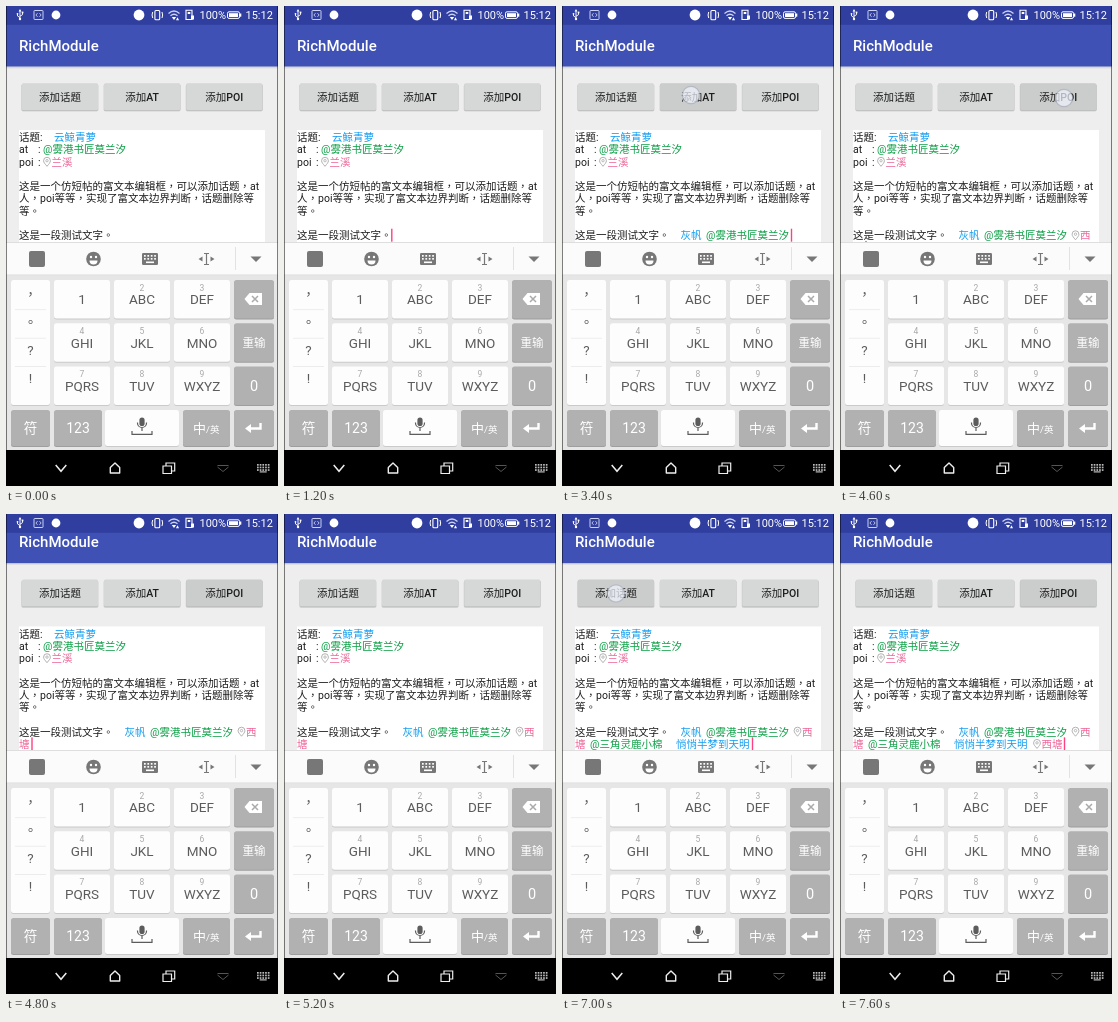
Write an HTML page that moves like this. It is 272 px wide and 480 px high and loops after 8 s.

```html
<!DOCTYPE html>
<html lang="zh-Hant">
<head>
<meta charset="utf-8">
<title>RichModule</title>
<style>
html, body { margin: 0; width: 100%; height: 100%; overflow: hidden; background: #000; }
svg { display: block; width: 100%; height: 100%; }
text { font-family: Roboto, "Noto Sans CJK TC", "Noto Sans CJK SC", "Noto Sans CJK", sans-serif; }
</style>
</head>
<body>
<svg id="stage" viewBox="0 0 272 480"></svg>
<script>
const BLUE = '#129df0', GREEN = '#0b9f45', PINK = '#ee6699', INK = '#1c1c1c';
const LINE = 12.25, SIZE = 10.5, SCROLL = 11.6;

const rect = (x, y, w, h, fill, more = '') =>
  `<rect x="${x}" y="${y}" width="${w}" height="${h}" fill="${fill}" ${more}/>`;
const circle = (x, y, r, fill, more = '') =>
  `<circle cx="${x}" cy="${y}" r="${r}" fill="${fill}" ${more}/>`;
const line = (d, color, width = 1, more = '') =>
  `<path d="${d}" fill="none" stroke="${color}" stroke-width="${width}" ${more}/>`;
const shape = (d, fill) => `<path d="${d}" fill="${fill}"/>`;
const text = (x, y, str, size, fill, more = '') =>
  `<text x="${x}" y="${y}" font-size="${size}" fill="${fill}" ${more}>${str}</text>`;
const mid = (x, y, str, size, fill, more = '') =>
  text(x, y, str, size, fill, 'text-anchor="middle" ' + more);
const group = (body, more = '') => `<g ${more}>${body}</g>`;

const baseline = row => 135.2 + row * LINE;
const word = (x, row, str, color = INK) => text(x, baseline(row), str, SIZE, color);
const place = (x, row, str) => {
  const y = baseline(row);
  return line(`M${x + 4} ${y + .6}C${x + 2} ${y - 2} ${x + .6} ${y - 3} ${x + .6} ${y - 5}` +
    `a3.4 3.4 0 0 1 6.8 0C${x + 7.4} ${y - 3} ${x + 6} ${y - 2} ${x + 4} ${y + .6}Z`, '#aaa', .9) +
    circle(x + 4, y - 5, 1.2, 'none', 'stroke="#aaa" stroke-width=".8"') +
    word(x + 8.5, row, str, PINK);
};

// Pieces added to the text, with the caret position after each
const inserts = [
  { caret: 107.8, body: '' },
  { caret: 142, body: word(118.5, 8, '灰帆', BLUE) },
  { caret: 229.5, body: word(144, 8, '@雾港书匠莫兰汐', GREEN) },
  { caret: 26, row: 9, body: place(231.5, 8, '西') + word(13, 9, '塘', PINK) },
  { caret: 104.5, row: 9, body: word(28, 9, '@三角灵鹿小棉', GREEN) },
  { caret: 190.5, row: 9, body: word(114, 9, '悄悄半梦到天明', BLUE) },
  { caret: 224.5, row: 9, body: place(193, 9, '西塘') }
];

const buttons = [['添加话题', ''], ['添加', 'AT'], ['添加', 'POI']];
const touches = [[54, 91], [129, 89], [224, 92]];

// time, pieces shown, touched button (-1 none), caret visible
const steps = [
  [0, 0, -1, 0], [200, 0, -1, 1], [800, 0, -1, 0], [1200, 0, -1, 1],
  [1800, 0, 0, 0], [2000, 1, 0, 1], [2200, 1, -1, 1], [2400, 1, -1, 0],
  [3000, 1, -1, 1], [3200, 1, 1, 1], [3400, 2, 1, 1], [3600, 2, -1, 1],
  [4000, 2, -1, 0], [4400, 2, 2, 1], [4600, 3, 2, 1], [4800, 3, -1, 1],
  [5200, 3, -1, 0], [5800, 3, -1, 1], [6200, 3, 1, 0], [6600, 4, 1, 1],
  [6800, 4, 0, 1], [7000, 5, 0, 1], [7200, 5, 2, 1], [7400, 6, 2, 1],
  [7600, 6, -1, 1]
];
const stepAt = t => steps.filter(s => s[0] <= Math.max(t, 0)).pop();

function page() {
  let s = rect(0, 0, 272, 60.7, '#3f51b5') + rect(0, 60.7, 272, .9, '#c2c2c6') + rect(0, 61.6, 272, 1, '#e0e0e2') +
    text(13, 44.8, 'RichModule', 15, '#fff', 'font-weight="500"');
  buttons.forEach(([han, latin], i) => {
    const x = 15.8 + i * 82.2;
    s += rect(x - .5, 78.2, 77.2, 27.3, '#000', 'rx="2" opacity=".12"') +
      rect(x, 77.7, 76.2, 27, '#000', 'rx="1.5" opacity=".14"') +
      rect(x, 77.2, 76.2, 27, '#d6d7d7', 'rx="1.5" class="key"') +
      mid(x + 38.1, 94.9, `${han}<tspan font-weight="500">${latin}</tspan>`, 10.5, '#1c1c1c');
  });
  s += rect(13, 124, 246, 140, '#fff') +
    word(13, 0, '话题:') + word(48, 0, '云鲸青萝', BLUE) +
    word(13, 1, 'at') + word(32, 1, ':') + word(37, 1, '@雾港书匠莫兰汐', GREEN) +
    word(13, 2, 'poi') + word(32, 2, ':') + place(37, 2, '兰溪') +
    word(13, 4, '这是一个仿短帖的富文本编辑框，可以添加话题，at') +
    word(13, 5, '人，poi等等，实现了富文本边界判断，话题删除等') +
    word(13, 6, '等。') + word(13, 8, '这是一段测试文字。');
  s += inserts.map(p => group(p.body, 'class="piece"')).join('');
  return s + rect(0, 0, 1.4, 13, '#ff4081', 'id="caret"');
}

function statusBar() {
  const w = '#fff', d = '#c9d0f2';
  return rect(0, 0, 272, 18.8, '#303f9f') +
    line('M14 4.5V13M14 11.5L11.5 10V8M14 10.2L16.5 8.7V7', w, .9) + shape('M12.6 5.5L14 3L15.4 5.5Z', w) +
    circle(14, 13, 1.2, w) + circle(11.5, 7.8, .9, w) + rect(15.7, 5.6, 1.7, 1.7, w) +
    rect(28, 4.5, 9, 9, 'none', `stroke="${d}" rx=".6"`) +
    line('M31.5 7.2L29.9 9L31.5 10.8M33.5 7.2L35.1 9L33.5 10.8', d, .9) +
    circle(50, 9, 4.4, w) + circle(133, 9, 5.4, w) +
    rect(148.9, 4.5, 4.8, 9.2, 'none', `stroke="${w}" stroke-width="1.1" rx="1"`) +
    line('M146.7 6Q145.4 9 146.7 12M156 6Q157.3 9 156 12', w, 1) +
    line('M162.5 7.5Q168 2.5 173.5 7.5M164.5 9.7Q168 6.8 171.5 9.7', d, 1.3) +
    shape('M165.8 11L168 14L170.2 11Z', w) + shape('M170 14.2l1.5-3 1.5 3Z', w) +
    line('M180 4.3H186V13.5H180Z', w, 1.1) + rect(181.7, 6, 2.6, 2, w) + rect(185, 9.5, 3, 4, w) +
    text(193.5, 13, '100%', 11, w) +
    rect(221.5, 5.8, 12, 6.6, 'none', `stroke="${w}" rx="1.5"`) + rect(234, 7.5, 1.3, 3.2, w) +
    rect(223, 7.2, 9, 3.8, w) +
    text(239.5, 13, '15:12', 11, w);
}

function key(x, y, w, h, dark) {
  return rect(x, y + 1, w, h, dark ? '#9e9e9e' : '#cacaca', 'rx="2.5"') +
    rect(x, y, w, h, dark ? '#b1b1b1' : '#fdfdfd', 'rx="2.5"');
}

function dots(x, y, cols, rows, dx, dy, size, color) {
  let s = '';
  for (let i = 0; i < cols * rows; i++)
    s += rect(x + i % cols * dx, y + Math.floor(i / cols) * dy, size, size, color);
  return s;
}

function keyboard() {
  const g = '#777', dark = '#5c5c5c', w = '#fff';
  let s = rect(0, 236, 272, 208, '#e6e6e6') + rect(0, 236, 272, 33, '#fbfbfb') +
    rect(0, 236, 272, .8, '#d8d8d8') + rect(0, 268.5, 272, .8, '#dcdcdc') +
    rect(23, 245, 16, 16, g, 'rx="2"') +
    circle(87.5, 253, 7.3, g) + circle(85, 251, 1.2, w) + circle(90, 251, 1.2, w) +
    shape('M83.5 254.5H91.5A4 4 0 0 1 83.5 254.5Z', w) +
    rect(136, 247, 16, 12, g, 'rx="1.3"') + dots(138, 249, 4, 2, 3.4, 3, 1.7, w) + rect(140, 255.5, 8, 1.6, w) +
    line('M198 247.5H203M198 258.5H203M200.5 247.5V258.5', g, 1.2) +
    shape('M196.5 250.5V255.5L192.5 253ZM204.5 250.5V255.5L208.5 253Z', g) +
    rect(229, 241, .8, 23, '#ddd') + shape('M244.5 250.5H255.5L250 256Z', g);

  s += key(5, 274, 39, 125);
  ['，', '。', '?', '!'].forEach((c, i) => {
    s += mid(24.5, 292.5 + i * 28.2, c, 13.5, dark);
    if (i) s += rect(9, 275 + i * 28.4, 31, .7, '#e6e6e6');
  });
  ['1', 'ABC', 'DEF', 'GHI', 'JKL', 'MNO', 'PQRS', 'TUV', 'WXYZ'].forEach((label, i) => {
    const x = 48 + i % 3 * 60, y = 274 + Math.floor(i / 3) * 43.3;
    s += key(x, y, 56, 38.5) + mid(x + 28, y + 24.3, label, 13.5, dark);
    if (i) s += mid(x + 28, y + 10.5, i + 1, 8.5, '#a8a8a8');
  });
  for (let i = 0; i < 3; i++) s += key(228, 274 + i * 43.3, 40, 38.5, true);
  s += shape('M238.5 293L243.5 287H256V299H243.5Z', w) + line('M246 290L252 296M252 290L246 296', '#aaa', 1.5) +
    mid(248, 340.8, '重输', 11.5, w, 'font-weight="500"') + mid(248, 385, '0', 14.5, w);

  s += key(5, 404, 39, 36, true) + key(48, 404, 48, 36, true) + key(99, 404, 74, 36) +
    key(177, 404, 47, 36, true) + key(228, 404, 40, 36, true) +
    mid(24.5, 427, '符', 13.5, w) + mid(72, 427, '123', 14, w) +
    text(187, 427, '中<tspan font-size="9.5">/英</tspan>', 13, w) +
    rect(133.4, 411.5, 5.2, 8.5, dark, 'rx="2.6"') +
    line('M131.5 416.5V417A4.5 4.5 0 0 0 140.5 417V416.5M136 421.5V425', dark, 1.2) +
    line('M126 425V428.3H146V425', dark, 1.2) +
    line('M254.5 417V422.5H243', w, 2.4) + shape('M239 422.5L245 418V427Z', w);
  return s;
}

function navBar() {
  const w = '#eee';
  return rect(0, 444, 272, 36, '#000') +
    line('M49.7 459L55 465.3L60.3 459', w, 1.5) +
    line('M104.3 467V461.5L109 457L113.7 461.5V467Z', w, 1.4, 'stroke-linejoin="round"') +
    line('M157 460H165.5V467.5H157ZM160 459.5V457H168.7V465H166', w, 1.2) +
    line('M211.5 459.5H222.5M211.5 461L217 465.5L222.5 461', '#555', 1) +
    dots(251, 458, 5, 3, 2.7, 2.6, 1.7, '#bbb') + rect(253.7, 465.3, 7, 1.2, '#bbb');
}

const stage = document.getElementById('stage');
stage.innerHTML = rect(0, 0, 272, 480, '#eee') +
  group(page() + circle(0, 0, 8.6, '#eef2fb',
    'id="touch" fill-opacity=".72" stroke="#9aa3b5" stroke-opacity=".55" stroke-width="1.2"'), 'id="page"') +
  statusBar() + keyboard() + navBar() +
  rect(0, 0, 1, 480, '#000', 'opacity=".5"') + rect(271, 0, 1, 480, '#000', 'opacity=".5"');

const find = id => document.getElementById(id);
const pageEl = find('page'), caret = find('caret'), touch = find('touch');
const pieces = stage.querySelectorAll('.piece'), keys = stage.querySelectorAll('.key');
const show = (el, on) => el.setAttribute('visibility', on ? 'visible' : 'hidden');

function render(t) {
  const [at, count, pressed, blink] = stepAt(t);
  const tinted = stepAt(t - 200)[2]; // the press tint trails the finger
  pageEl.setAttribute('transform', `translate(0 ${at >= 4800 ? -SCROLL : 0})`);
  pieces.forEach((el, i) => show(el, i <= count));
  keys.forEach((el, i) => el.setAttribute('fill', i === tinted ? '#cbcccc' : '#d6d7d7'));

  const { caret: x, row = 8 } = inserts[count];
  caret.setAttribute('x', x - .7);
  caret.setAttribute('y', baseline(row) - 10.5);
  show(caret, blink);

  show(touch, pressed >= 0);
  if (pressed >= 0) {
    touch.setAttribute('cx', touches[pressed][0]);
    touch.setAttribute('cy', touches[pressed][1]);
  }
}

const start = performance.now();
function tick() {
  render((performance.now() - start) % 8000);
  requestAnimationFrame(tick);
}
tick();
</script>
</body>
</html>
```
